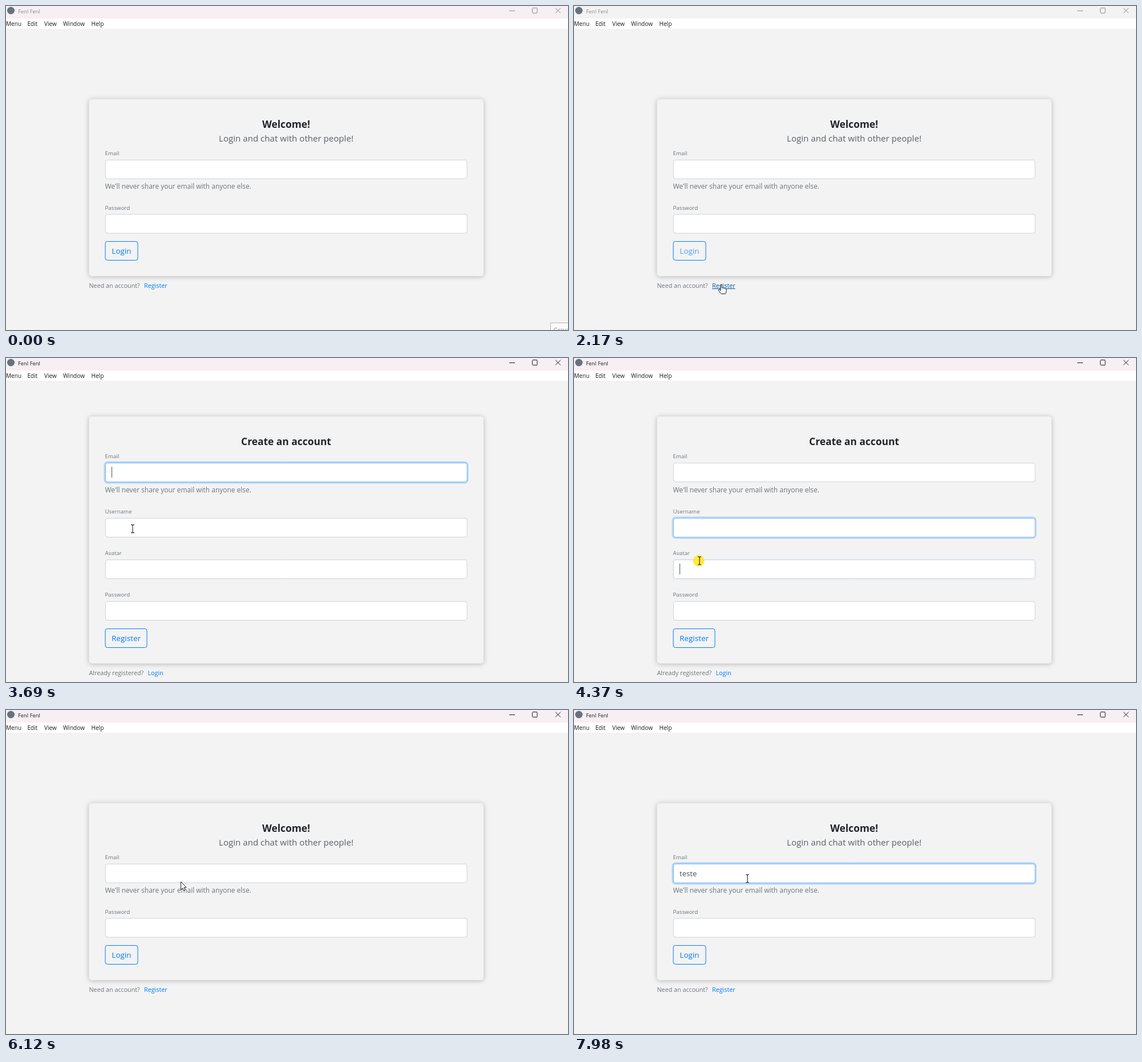
An HTML page with a canvas that plays this animation: 985 by 569 pixels, repeating every 8000 ms.

```html
<!DOCTYPE html>
<html lang="en">
<head>
<meta charset="utf-8">
<title>Login demo</title>
<style>
  html, body { margin: 0; width: 100%; height: 100%; overflow: hidden; background: #f3f3f3; }
  canvas { display: block; }
</style>
</head>
<body>
<canvas id="stage" width="985" height="569"></canvas>
<script>
const ctx = document.getElementById('stage').getContext('2d');
const LOOP = 8000;
const FONT = '"Open Sans", "Noto Sans", sans-serif';
const BLUE = '#007bff', MUTED = '#6c757d', DARK = '#212529', PAGE = '#f3f3f3';
const FIELD = { x: 174, w: 634, h: 33 };
const HELP = "We'll never share your email with anyone else.";

const login = {
  top: 163.5, height: 311,
  title: ['Welcome!', 214], subtitle: ['Login and chat with other people!', 238],
  fields: [['Email', 270], ['Password', 365.5]], helpY: 321,
  button: { text: 'Login', y: 413, w: 57 },
  foot: { text: 'Need an account?', link: 'Register', x: 242, w: 40.5, y: 495 }
};
const register = {
  top: 102.5, height: 434,
  title: ['Create an account', 153],
  fields: [['Email', 184], ['Username', 281], ['Avatar', 354], ['Password', 427]], helpY: 235.5,
  button: { text: 'Register', y: 475, w: 73 },
  foot: { text: 'Already registered?', link: 'Login', x: 248.5, w: 27.5, y: 556.5 }
};
const OPEN_REGISTER = 2420, OPEN_LOGIN = 5720;

// [view, field index, focus time, blur time]
const focuses = [
  [register, 0, 3220, 3840], [register, 1, 3840, 4345],
  [register, 2, 4345, 4780], [register, 3, 4780, OPEN_LOGIN],
  [login, 0, 6320, LOOP]
];
const typing = [[7050, 't'], [7150, 'te'], [7250, 'tes'], [7450, 'teste']];
const clicks = [2220, 3140, 3790, 4310, 4740, 5460, 6270];

// pointer path: time, x, y
const path = [
  [70, 985, 562], [450, 610, 530], [820, 256, 484], [950, 258, 486], [1440, 258, 486],
  [1500, 235, 463], [1800, 234, 455], [2150, 258, 489], [2420, 258, 489], [2920, 236, 197],
  [3060, 228, 191], [3290, 228, 191], [3700, 222, 300], [3900, 222, 302], [4040, 221, 335],
  [4170, 220, 356], [4440, 220, 356], [4680, 222, 437], [4860, 222, 438], [5060, 233, 462],
  [5190, 249, 522], [5450, 260, 550], [5720, 260, 550], [6120, 306, 301], [6250, 304, 296]
];

const clamp = v => Math.max(0, Math.min(1, v));
const smooth = v => { v = clamp(v); return v * v * (3 - 2 * v); };
const ramp = (t, start, length) => smooth((t - start) / length);
const mix = (a, b, k) => `rgb(${a.map((v, i) => Math.round(v + (b[i] - v) * k)).join(',')})`;
const viewAt = t => t >= OPEN_REGISTER && t < OPEN_LOGIN ? register : login;

function pointerAt(t) {
  const next = path.findIndex(p => p[0] > t);
  if (next === 0) return path[0].slice(1);
  if (next < 0) return path[path.length - 1].slice(1);
  const [t0, x0, y0] = path[next - 1], [t1, x1, y1] = path[next];
  const k = smooth((t - t0) / (t1 - t0));
  return [x0 + (x1 - x0) * k, y0 + (y1 - y0) * k];
}

function overLink(view, [x, y]) {
  const f = view.foot;
  return x >= f.x && x <= f.x + f.w && y > f.y - 13 && y < f.y + 4;
}

function text(str, x, y, size, color, align = 'left', weight = 400) {
  ctx.font = `${weight} ${size}px ${FONT}`;
  ctx.fillStyle = color;
  ctx.textAlign = align;
  ctx.fillText(str, x, y);
}

function box(x, y, w, h, r, fill, stroke, line = 1) {
  ctx.beginPath();
  ctx.roundRect(x, y, w, h, r);
  if (fill) { ctx.fillStyle = fill; ctx.fill(); }
  if (stroke) { ctx.strokeStyle = stroke; ctx.lineWidth = line; ctx.stroke(); }
}

function lines(points, close) {
  ctx.beginPath();
  points.forEach(([x, y]) => ctx.lineTo(x, y));
  if (close) ctx.closePath();
}

function drawWindow(t) {
  const active = ramp(t, 2260, 180);
  const tint = Math.max(1 - ramp(t, 70, 250), active);
  ctx.fillStyle = PAGE;
  ctx.fillRect(0, 0, 985, 569);
  ctx.fillStyle = mix([243, 243, 243], [246, 239, 244], tint);
  ctx.fillRect(0, 0, 985, 22);
  ctx.fillStyle = '#fff';
  ctx.fillRect(0, 22, 985, 18);

  ctx.fillStyle = '#66737f';
  ctx.beginPath();
  ctx.arc(8.5, 8, 6.5, 0, Math.PI * 2);
  ctx.fill();
  const ink = mix([140, 140, 140], [24, 24, 24], active);
  text('Fenl Fenl', 21, 12.5, 9.4, ink);

  ctx.strokeStyle = ink;
  ctx.lineWidth = 1;
  lines([[882, 8.5], [892, 8.5]]);
  ctx.stroke();
  box(922.5, 3.5, 8.5, 9, 1, null, ink);
  lines([[963, 3.5], [972, 12.5]]);
  ctx.stroke();
  lines([[972, 3.5], [963, 12.5]]);
  ctx.stroke();

  const menu = [['Menu', 0], ['Edit', 37.5], ['View', 67], ['Window', 100], ['Help', 149.5]];
  menu.forEach(([name, x]) => text(name, x, 34.5, 10.1, '#1b1b1b'));
}

function drawField(view, index, t) {
  const [label, y] = view.fields[index];
  const { x, w, h } = FIELD;
  const focus = focuses.find(f => f[0] === view && f[1] === index);
  let glow = 0;
  if (focus && t >= focus[2]) {
    glow = ramp(t, focus[2], 150) * (focus[3] < LOOP ? 1 - ramp(t, focus[3], 150) : 1);
  }
  text(label, x - 0.5, y - 8, 9.75, MUTED);
  if (glow > 0) {
    box(x - 1, y - 1, w + 2, h + 3, 5, null, `rgba(0,123,255,${0.27 * glow})`, 3);
  }
  box(x + 0.5, y + 0.5, w - 0.5, h, 3.5, '#fff', mix([206, 212, 218], [128, 189, 255], glow));

  if (!focus || t < focus[2] || t >= focus[3]) return;
  const typed = view === login ? typing.filter(k => k[0] <= t).pop() : null;
  const value = typed ? typed[1] : '';
  text(value, 185, y + 22, 13.2, '#495057');
  const since = t - (typed ? typed[0] : focus[2]);
  if (since % 1060 < 530) {
    const caret = 185 + Math.round(ctx.measureText(value).width);
    ctx.fillStyle = '#495057';
    ctx.fillRect(caret, y + 7, 1, 19);
  }
}

function drawView(view, t) {
  ctx.save();
  ctx.shadowColor = 'rgba(0,0,0,0.26)';
  ctx.shadowBlur = 8;
  ctx.shadowOffsetY = 1;
  box(145.5, view.top, 691.5, view.height, 5, PAGE);
  ctx.restore();

  text(view.title[0], 491, view.title[1], 17.4, DARK, 'center', 700);
  if (view.subtitle) text(view.subtitle[0], 491, view.subtitle[1], 15.1, '#596067', 'center');
  view.fields.forEach((_, i) => drawField(view, i, t));
  text(HELP, 173.5, view.helpY, 11.95, MUTED);

  const b = view.button;
  const faded = t > 820 && t < OPEN_REGISTER;
  box(174, b.y + 0.5, b.w, 33, 3.5, null, BLUE);
  text(b.text, 174 + b.w / 2, b.y + 22, 13.5, faded ? '#4a9fff' : BLUE, 'center');

  const f = view.foot;
  const hover = t > 140 && overLink(view, pointerAt(t - 70));
  const color = hover ? '#0056b3' : BLUE;
  text(f.text, 145.5, f.y, 10.75, MUTED);
  text(f.link, f.x, f.y, 10.75, color);
  if (hover) ctx.fillRect(f.x, Math.round(f.y + 1), f.w, 1);
}

function drawTooltip() {
  box(954.5, 556.5, 60, 30, 0, '#fafafa', '#b4b4b4');
  text('Grava', 959.5, 573, 10.2, '#8c8c8c');
}

function drawBeam() {
  ctx.strokeStyle = '#222';
  ctx.lineWidth = 1.1;
  lines([[0, -6], [0, 6]]);
  ctx.stroke();
  for (const s of [-1, 1]) {
    lines([[-3, s * 7], [-1, s * 7], [0, s * 6], [1, s * 7], [3, s * 7]]);
    ctx.stroke();
  }
}

function outline() {
  ctx.fillStyle = '#fff';
  ctx.strokeStyle = '#222';
  ctx.lineWidth = 1;
  ctx.lineJoin = 'round';
  ctx.fill();
  ctx.stroke();
}

function drawArrow() {
  lines([[0.5, 0.5], [0.5, 14.5], [3.6, 11.7], [5.7, 16.5], [8, 15.5], [6, 10.8], [10.2, 10.8]], true);
  outline();
}

function drawHand() {
  lines([[-1, 1], [0, 0], [1.2, 1], [1.2, 6], [4, 6.2], [7, 7], [9, 8.5], [9, 12],
    [7.5, 16.5], [0, 16.5], [-5, 10.5], [-4, 9], [-1, 11]], true);
  outline();
}

function drawPointer(view, t) {
  const [x, y] = pointerAt(t);
  if (clicks.some(c => t >= c && t < c + 135)) {
    ctx.fillStyle = 'rgba(253,232,30,0.85)';
    ctx.beginPath();
    ctx.arc(x - 1.5, y, 10, 0, Math.PI * 2);
    ctx.fill();
  }
  const inField = x > FIELD.x && x < FIELD.x + FIELD.w &&
    view.fields.some(f => y >= f[1] && y < f[1] + FIELD.h - 3);
  ctx.save();
  ctx.translate(x, y);
  if (overLink(view, [x, y])) drawHand();
  else if (inField) drawBeam();
  else drawArrow();
  ctx.restore();
}

function frame(now) {
  const t = now % LOOP;
  const view = viewAt(t);
  drawWindow(t);
  drawView(view, t);
  if (t < 70) drawTooltip();
  else drawPointer(view, t);
  requestAnimationFrame(frame);
}
requestAnimationFrame(frame);
</script>
</body>
</html>
```
